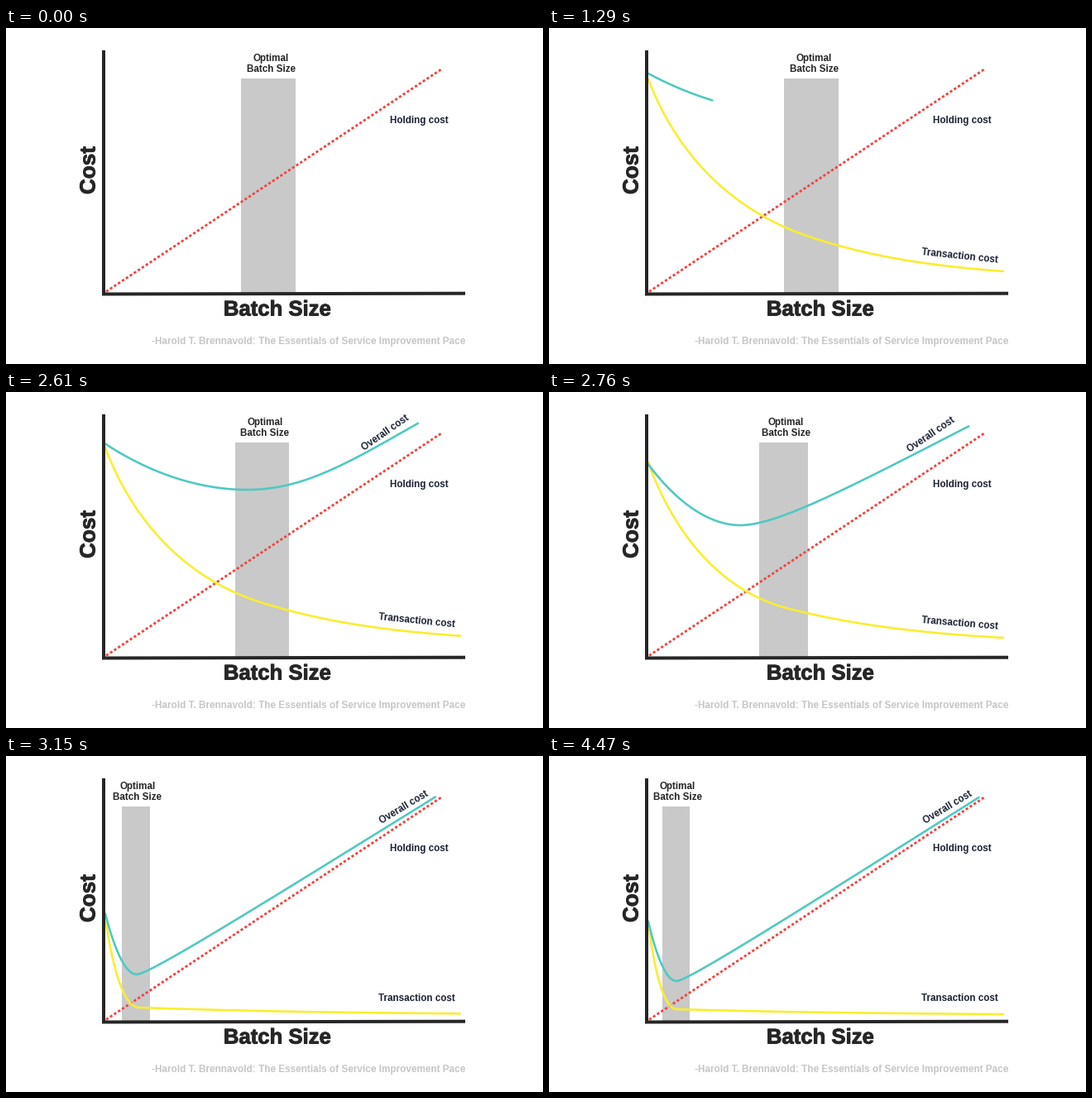
A matplotlib script for the animation above (4500 ms loop, 649 by 406 pixels).

```python
import numpy as np
import matplotlib.pyplot as plt
import matplotlib.patheffects as pe
from matplotlib.animation import FuncAnimation

W, H, DPI = 649, 406, 64
STEP, FRAMES = 30, 150
PT = 72 / DPI  # points per pixel

INK, NAVY, PALE = "#262626", "#1b2232", "#c6c6c6"
YELLOW, TEAL, RED, GREY = "#faee2e", "#4fc9c1", "#ef4540", "#c9c9c9"

plt.rcParams["font.family"] = "Liberation Sans"
plt.rcParams["font.weight"] = "bold"


def ramp(t, start, length):
    return float(np.clip((t - start) / length, 0, 1))


def ease_cubic(u):
    return 4 * u**3 if u < 0.5 else 1 - 4 * (1 - u)**3


def ease_strong(u):
    """Timing curve with handles at (.75, 0) and (.25, 1)."""
    s = np.linspace(0, 1, 400)
    x = 2.25 * (1 - s)**2 * s + 0.75 * (1 - s) * s**2 + s**3
    return float(np.interp(u, x, 3 * s**2 - 2 * s**3))


def mix(a, b, k):
    return a + (b - a) * k


def cubic(a, b, c, d):
    s = np.linspace(0, 1, 60)[:, None]
    return (1 - s)**3 * a + 3 * (1 - s)**2 * s * b + 3 * (1 - s) * s**2 * c + s**3 * d


def transaction_path(q):
    """Steep fall to a knee, then a tail that flattens towards the end."""
    start = np.array([120, mix(62, 200, q)])
    knee = np.array([mix(317, 154, q), mix(253, 306, q)])
    end = np.array([549, mix(294, 312, q)])
    fall, tail = knee - start, end - knee
    steep = np.array([1, 1.85 * tail[1] / tail[0]])
    flat = np.array([1, 0.43 * tail[1] / tail[0]])
    return np.vstack([
        cubic(start, start + fall * (0.17, 0.46), knee - 0.5 * fall[0] * steep, knee),
        cubic(knee, knee + 0.34 * tail[0] * steep, end - 0.34 * tail[0] * flat, end),
    ])


def overall_path(q):
    """Dip to a level lowest point, then a rise that straightens as it narrows."""
    def key(*values):
        return np.interp(q, (0, 0.17, 0.63, 1), values)

    start = np.array([120, key(55, 88, 110, 200)])
    low = np.array([key(309, 230, 191, 154), key(105, 162, 195.5, 272)])
    u = (309 - low[0]) / 155
    end = np.array([mix(495, 519.5, u), mix(37.5, 50, u**1.7)])
    fall = low - start
    reach = np.array([0.39 * fall[0], 0])
    lift = low + reach
    return np.vstack([
        cubic(start, start + fall * (0.25, 0.51), low - reach, low),
        cubic(low, lift, mix(lift, end, 0.36), end),
    ])


def trace(line, xy, part):
    """Show a share of the path, measured along its length."""
    run = np.r_[0, np.cumsum(np.hypot(*np.diff(xy, axis=0).T))]
    at = np.linspace(0, part * run[-1], 160)
    line.set_data(np.interp(at, run, xy[:, 0]), np.interp(at, run, xy[:, 1]))
    line.set_visible(part > 0)


fig = plt.figure(figsize=(W / DPI, H / DPI), dpi=DPI, facecolor="white")
ax = fig.add_axes([0, 0, 1, 1])
ax.set_xlim(0, W)
ax.set_ylim(H, 0)
ax.axis("off")


def label(x, y, text, size=11.6, color=NAVY, ha="center", angle=0):
    return ax.text(x, y, text, fontsize=size * PT, color=color, ha=ha, va="baseline",
                   rotation=angle, rotation_mode="anchor", zorder=6)


def title(x, y, text, size, angle=0):
    heavy = pe.withStroke(linewidth=0.9 * PT, foreground=INK)
    label(x, y, text, size, INK, angle=angle).set_path_effects([heavy])


def stroke(x, y, color, width, z, **kw):
    return ax.plot(x, y, color=color, lw=width * PT, zorder=z, **kw)[0]


band = ax.add_patch(plt.Rectangle((284, 60.5), 66, 259, color=GREY, lw=0, zorder=1))
stroke([121, 526], [318.5, 50], RED, 2.8, 2, dashes=(1.15, 0.9), dash_capstyle="butt")
transaction = stroke([], [], YELLOW, 2.6, 3, solid_capstyle="round")
overall = stroke([], [], TEAL, 2.6, 4, solid_capstyle="round")
stroke([117.8, 117.8], [27, 323], INK, 4, 5, solid_capstyle="butt")
stroke([116, 555], [321.5, 320.7], INK, 4, 5, solid_capstyle="butt")

title(328, 347.5, "Batch Size", 25.7)
title(107.5, 172, "Cost", 26.1, angle=90)
label(499, 115, "Holding cost")
label(555, 382, "-Harold T. Brennavold: The Essentials of Service Improvement Pace",
      11.7, PALE, ha="right")
captions = [label(320, 40, "Optimal", color=INK), label(320, 53, "Batch Size", color=INK)]
transaction_tag = label(0, 0, "Transaction cost")
overall_tag = label(0, 0, "Overall cost")


def place(tag, x, y, angle, alpha):
    tag.set_position((x, y))
    tag.set_rotation(angle)
    tag.set_alpha(alpha)


def update(i):
    t = i * STEP
    p = ease_strong(ramp(t, 2400, 900))  # band and labels
    q = ease_strong(ramp(t, 2400, 960))  # curves trail slightly

    band.set_x(mix(284, 137, p))
    band.set_width(mix(66, 33, p))
    for c in captions:
        c.set_x(mix(320.5, 155.5, p))

    trace(transaction, transaction_path(q), ease_cubic(ramp(t, 0, 720)))
    trace(overall, overall_path(q), ease_cubic(ramp(t, 1020, 720)))
    place(transaction_tag, 496.5, mix(279, 296, p), mix(-6, 0, p), ramp(t, 720, 210))
    place(overall_tag, mix(459, 483.2, p), mix(51.5, 65, p), mix(35, 31, p),
          ramp(t, 1740, 210))
    return [band, transaction, overall, transaction_tag, overall_tag, *captions]


anim = FuncAnimation(fig, update, frames=FRAMES, interval=STEP, repeat=True,
                     repeat_delay=0, init_func=lambda: update(0))
plt.show()
```
